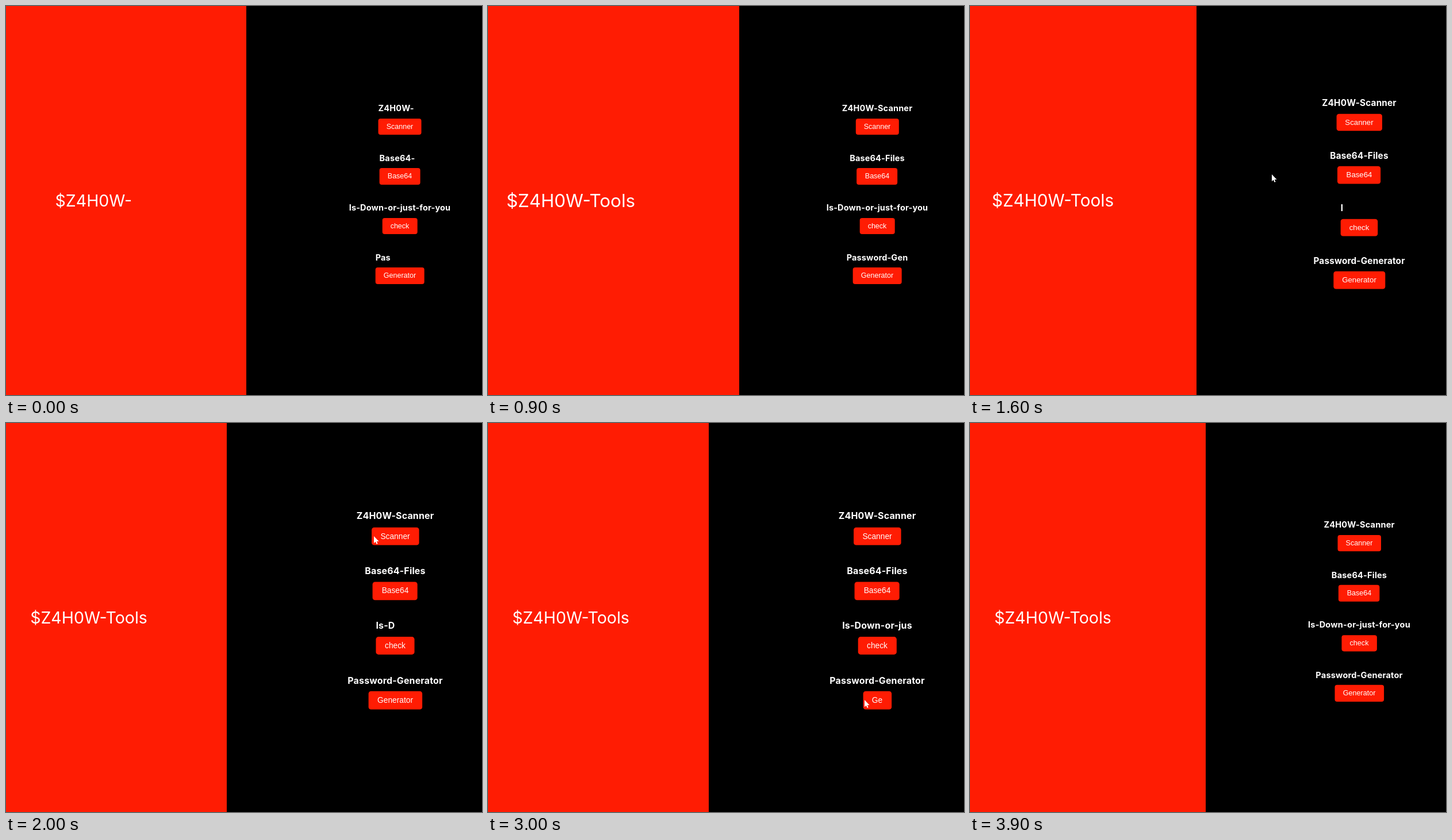
An HTML page that plays this animation: 828 px wide and 677 px high, repeating every 4 s.

```html
<!DOCTYPE html>
<html lang="en">
<head>
<meta charset="utf-8">
<title>Tools</title>
<style>
  html, body { margin: 0; width: 100%; height: 100%; overflow: hidden; background: #000; }
  #stage { position: absolute; left: 0; top: 0; width: 828px; height: 677px; overflow: hidden; color: #fff; white-space: nowrap; }
  #left { position: absolute; left: 0; top: 0; height: 100%; background: #ff1c03; }
  #title { position: absolute; top: 339px; font: 400 28.5px/36px Inter, sans-serif; }
  #menu { position: absolute; top: 338.2px; width: 0; height: 0; }
  .item { position: absolute; left: 0; transform: translateX(-50%); width: max-content; }
  .label { height: 18px; font: 700 14.5px/18px Inter, sans-serif; letter-spacing: .15px; }
  .button { width: max-content; height: 28.6px; margin: 8.5px auto 0; padding: 0 14.2px; border-radius: 4px;
    background: #ff1c03; font: 12.5px/28px "Liberation Sans", Arial, sans-serif; }
  #cursor { position: absolute; left: 0; top: 0; overflow: visible; }
</style>
</head>
<body>
<div id="stage">
  <div id="left"></div>
  <div id="title"></div>
  <div id="menu"></div>
  <svg id="cursor" width="18" height="20" fill="#fff">
    <path id="arrow" d="M0 0V12.2L2.8 9.6L4.6 13.8L6.6 12.9L4.8 8.9H8.6Z"/>
    <path id="hand" d="M-1.4 1.2Q-1.4 0 0 0Q1.4 0 1.4 1.2V5.2L6 6.2Q7.2 6.6 7 8L6.2 13V16H-2.6V14L-6.4 9.6Q-6.8 8 -5 8.2L-1.4 10Z"/>
  </svg>
</div>
<script>
const LOOP = 4000, STEP = 100, FADE = 450;
const PITCH = 86.6, BUTTON_TOP = -142.5, BUTTON_HEIGHT = 28.6;
const $ = id => document.getElementById(id);

const smooth = p => p * p * (3 - 2 * p);
const easeOut = p => 1 - (1 - p) ** 2;

// Eased hover amount from 0 to 1 and back
function hover(t, enter, leave, ease) {
  const ramp = start => ease(Math.min(1, Math.max(0, (t - start) / FADE)));
  return ramp(enter) - ramp(leave);
}
const leftHover = (t, ease) => hover(t, 350, 1350, ease);
const rightHover = (t, ease) => hover(t, 1350, 3520, ease);
const menuScale = t => 1 + 0.1 * rightHover(t, smooth);

// Pointer route: time, x, y
const route = [[1300, 470, 690], [1600, 525, 293], [2000, 640, 197], [2600, 682, 313], [3000, 655, 482], [3500, 451, 675]];

function pointerAt(t) {
  const i = Math.max(1, route.findIndex(p => p[0] >= t));
  const [t0, x0, y0] = route[i - 1], [t1, x1, y1] = route[i];
  const p = (t - t0) / (t1 - t0);
  return [x0 + (x1 - x0) * p, y0 + (y1 - y0) * p];
}

// One more character per step, counted from the moment the text is empty
const typed = (text, start, t) => text.slice(0, Math.max(0, Math.floor((t - start) / STEP)));

// Shows the whole text, then types it again from the given moment
const retyped = (text, start, t) => t < start ? text : typed(text, start, t);

const items = [
  { label: t => typed("Z4H0W-Scanner", -600, t), button: () => "Scanner" },
  { label: t => typed("Base64-Files", -700, t), button: () => "Base64" },
  { label: t => t < 1400 ? "Is-Down-or-just-for-you" : typed("Is-Down-or-just-for-you", 1600, t) || "I", button: () => "check" },
  { label: t => typed("Password-Generator", -300, t), button: t => retyped("Generator", 2800, t) }
];

function addBox(parent, name) {
  const el = document.createElement("div");
  el.className = name;
  return parent.appendChild(el);
}

items.forEach((item, i) => {
  const box = addBox($("menu"), "item");
  box.style.top = i * PITCH - 169 + "px";
  item.labelBox = addBox(box, "label");
  item.buttonBox = addBox(box, "button");
});

function overButton(t) {
  const [px, py] = pointerAt(t), s = menuScale(t);
  const x = (px - 677) / s, y = (py - 338.2) / s - BUTTON_TOP;
  return Math.abs(x) < 38 && items.some((_, i) => y > i * PITCH && y < i * PITCH + BUTTON_HEIGHT);
}

function drawPointer(t) {
  const visible = t >= 1300 && t <= 3500;
  $("cursor").style.display = visible ? "block" : "none";
  if (!visible) return;
  const [x, y] = pointerAt(t);
  const hand = overButton(t - STEP); // the shape lags one step behind
  $("cursor").style.transform = `translate(${x}px, ${y}px)`;
  $("hand").style.display = hand ? "inline" : "none";
  $("arrow").style.display = hand ? "none" : "inline";
}

function draw(t) {
  const shift = t < 400 ? 8 : 0; // the page is wider until the scrollbar appears
  $("left").style.width = 410.3 + shift + 26.7 * leftHover(t, easeOut) - 26.3 * rightHover(t, easeOut) + "px";

  const title = $("title");
  title.textContent = typed("$Z4H0W-Tools", -700, t);
  title.style.left = 144.3 + shift + "px";
  title.style.transform = `translate(-50%, -50%) scale(${1 + 0.1 * leftHover(t, smooth)})`;

  $("menu").style.left = 677 + shift + "px";
  $("menu").style.transform = `scale(${menuScale(t)})`;
  for (const item of items) {
    item.labelBox.textContent = item.label(t);
    item.buttonBox.textContent = item.button(t);
  }
  drawPointer(t);
}

const begin = performance.now();
function tick() {
  const t = (performance.now() - begin) % LOOP;
  draw(Math.floor(t / STEP) * STEP);
  requestAnimationFrame(tick);
}
tick();
</script>
</body>
</html>
```
